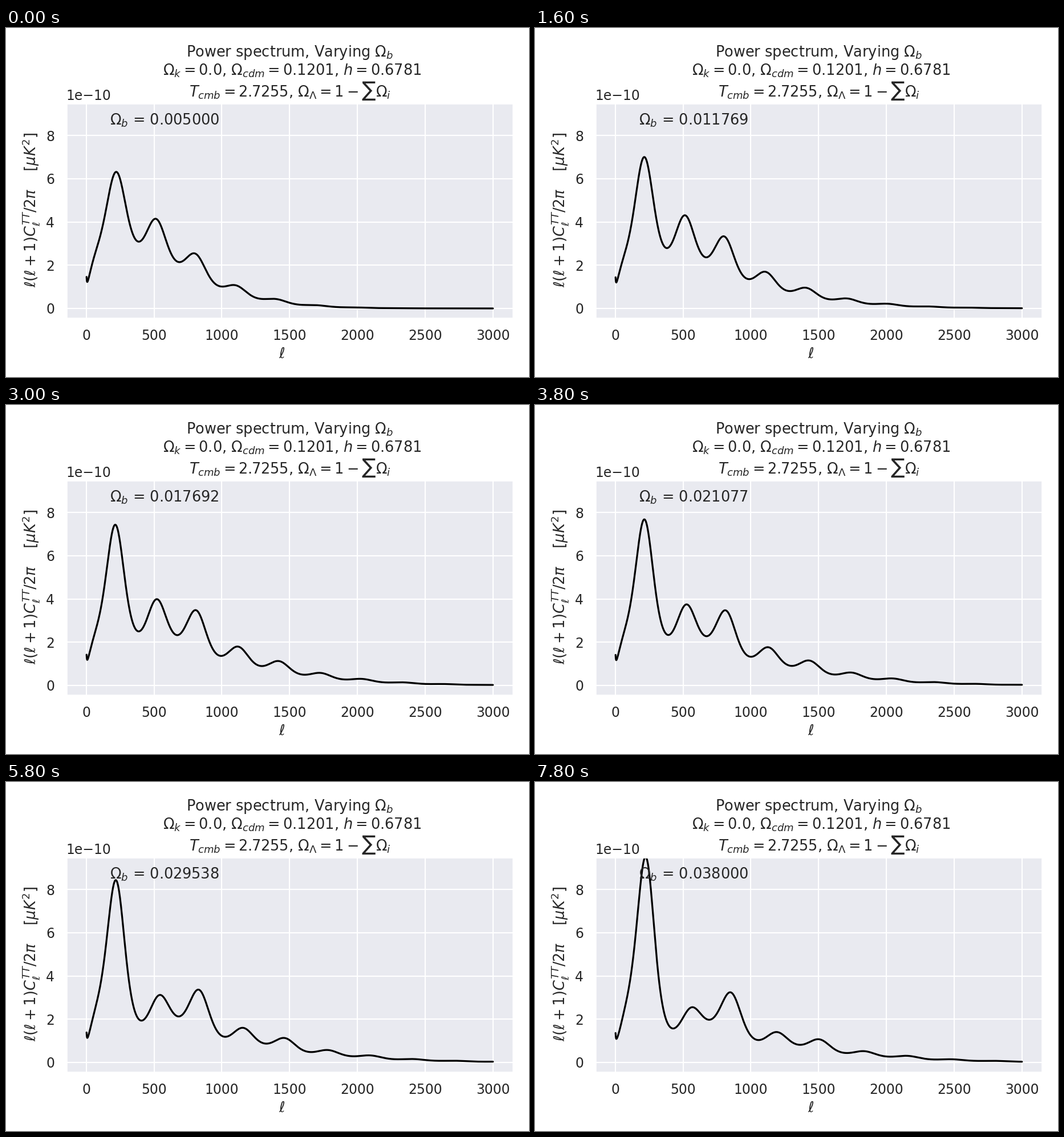
A matplotlib script that plays this animation: 917 px wide and 611 px high, repeating every 8000 ms.

```python
import numpy as np
import matplotlib.pyplot as plt
from matplotlib.animation import FuncAnimation

W, H, DPI = 917, 611, 154
FRAMES, INTERVAL = 40, 200
INK = "0.15"

plt.rcParams.update({
    "font.family": "DejaVu Sans", "font.size": 12, "text.color": INK,
    "axes.facecolor": "#e9eaf0", "axes.edgecolor": "white",
    "axes.linewidth": 1.25, "axes.labelcolor": INK, "axes.labelsize": 12,
    "axes.axisbelow": True, "axes.grid": True,
    "grid.color": "white", "grid.linewidth": 1, "grid.linestyle": "-",
    "xtick.labelsize": 11, "ytick.labelsize": 11,
    "xtick.color": INK, "ytick.color": INK,
    "xtick.major.size": 6, "ytick.major.size": 6,
    "xtick.major.pad": 2.7,
    "xtick.bottom": False, "ytick.left": False,
    "lines.solid_capstyle": "round",
})

ell = np.arange(2, 3001)


def spectrum(t):
    """Damped acoustic peaks; t runs from the least to the most baryons."""
    thin = np.exp(-t / 0.18)

    # Peak number: whole at peaks, half at troughs
    spacing = 300 + 12 * t + 14 * t ** 2
    offset = 80 + 30 * np.sqrt(t)
    n = (ell + offset) / spacing - (0.07 + 0.2 * t) * np.exp(-ell / 250)

    damping = (0.124 + 0.043 * thin) * n ** (1.6 + 0.15 * thin)
    level = 1.73 - 0.37 * t - damping
    boost = 0.1 * (1 - t) * np.exp(-((n - 2.75) / 0.7) ** 2)
    wave = (0.37 - 0.09 * thin) * np.exp(-n / 11) * np.cos(2 * np.pi * n)

    # Baryons raise odd peaks and lower even ones
    phase = np.pi * (n - 1)
    loading = (0.05 + 0.65 * t + 0.3 * t ** 2) * np.exp(-n / 2)
    parity = loading * (np.cos(phase) - 0.58 * np.sin(phase))
    peaks = np.exp(level + boost + wave + parity)

    # Low plateau with a short hook at its start
    plateau = 1.1 - 0.095 * t
    rise = 1 - np.exp(-(ell / (90 - 25 * t)) ** 1.6)
    hook = 0.35 * np.exp(-(ell - 2) / 2.5)
    return (plateau + (peaks - plateau) * rise + hook) * 1e-10


fig = plt.figure(figsize=((W + 1e-3) / DPI, (H + 1e-3) / DPI), dpi=DPI,
                 facecolor="white")
left, right, top, bottom = 105.6, 889.4, 132.5, 508
ax = fig.add_axes([left / W, 1 - bottom / H, (right - left) / W, (bottom - top) / H])
ax.set_xlim(-147.9, 3149.9)
ax.set_ylim(-0.45e-10, 9.47e-10)
ax.set_xticks(range(0, 3001, 500))
ax.set_yticks([v * 1e-10 for v in (0, 2, 4, 6, 8)])
ax.set_xlabel(r"$\ell$", x=0.483, labelpad=3.6)
ax.set_ylabel(r"$\ell(\ell+1)C_\ell^{TT}/2\pi$    $[\mu K^2]$", y=0.504)

title = {
    49.5: r"Power spectrum, Varying $\Omega_b$",
    82: r" $\Omega_k = 0.0$, $\Omega_{cdm} = 0.1201$, $h = 0.6781$",
    119.7: r"$T_{cmb} = 2.7255$, $\Omega_\Lambda = 1 - \sum \Omega_i$",
}
for y, line in title.items():
    fig.text((left + right) / 2 / W, 1 - y / H, line, ha="center", va="baseline")

curve, = ax.plot([], [], color="black", lw=1.5)
label = ax.text(175, 8.48e-10, "")


def update(step):
    t = step / (FRAMES - 1)
    curve.set_data(ell, spectrum(t))
    label.set_text(rf"$\Omega_b$ = {0.005 + 0.033 * t:.6f}")
    return curve, label


anim = FuncAnimation(fig, update, frames=FRAMES, interval=INTERVAL,
                     repeat=True, repeat_delay=0)
plt.show()
```
